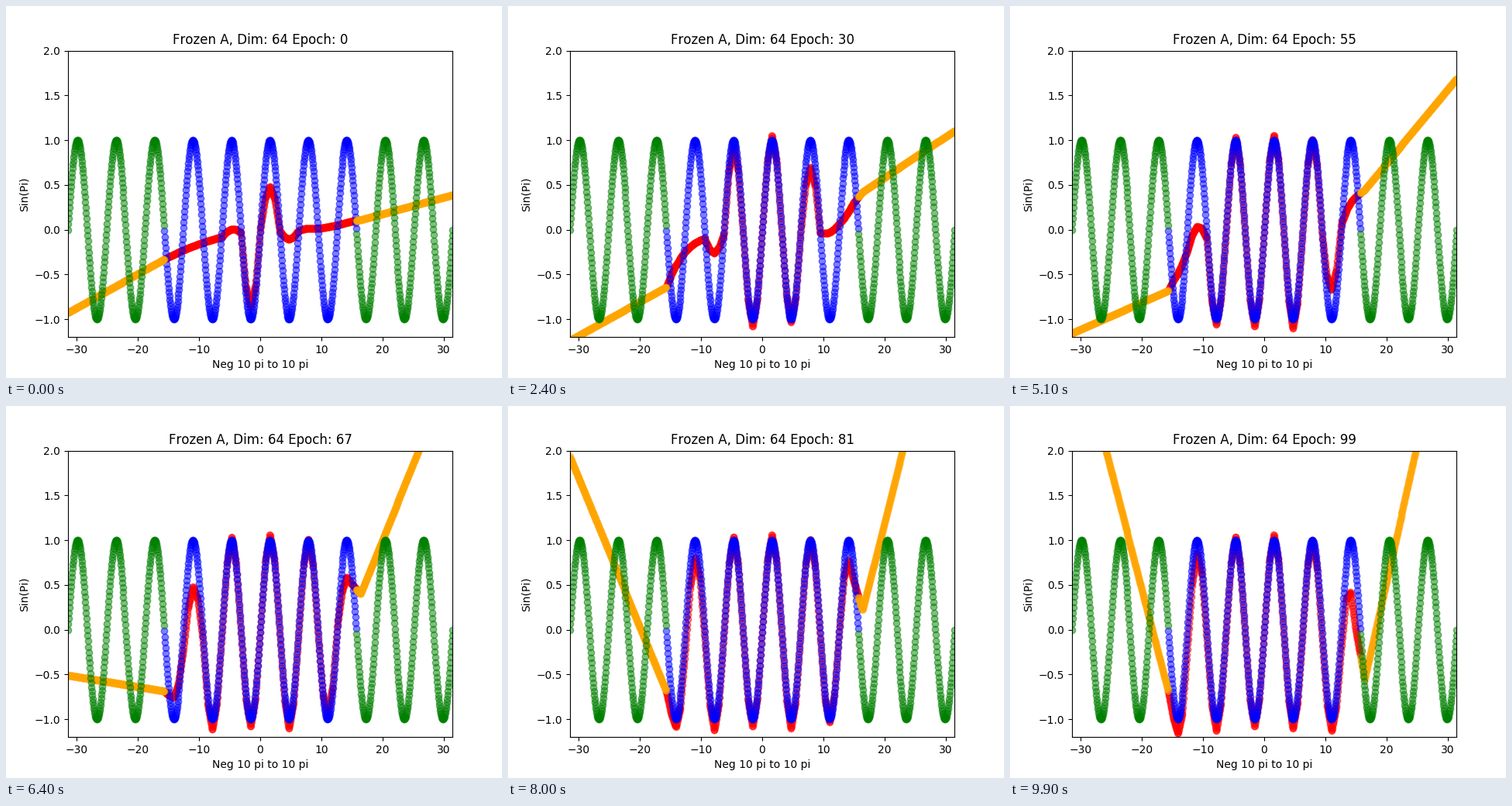
Animation of 640x480 px, one loop 10000 ms. Source, as a matplotlib script:

```python
import numpy as np
import matplotlib.pyplot as plt
from matplotlib.animation import FuncAnimation

plt.rcParams["text.kerning_factor"] = 6

EPOCHS = 100
SPAN = 10 * np.pi
EDGE = 5 * np.pi
TURN = 16.4  # where the right tail bends away

x = np.linspace(-SPAN, SPAN, 1000)
inside = np.abs(x) <= EDGE
truth = np.sin(x)

# Epoch at which each half wave, left to right, is half learned
START = np.array([68, 64, 39, 17, -8, 1, 14, 25, 51, 66])

knots = np.append(np.linspace(-EDGE, EDGE, 41)[:-1], TURN)
wave = np.floor(knots / np.pi).astype(int) + 5
reach = np.minimum(np.abs(knots) / EDGE, 1)


def sigmoid(t):
    return 1 / (1 + np.exp(-t))


def predict(epoch):
    """Piecewise linear fit: a drifting baseline plus the learned half waves."""
    settle = 1 - np.exp(-epoch / 15)
    rim = 0.22 + 0.36 * settle
    fall = 1.1 * (epoch / EPOCHS) ** 7

    height = np.where(knots > 0, rim - fall, -rim)
    drift = height * reach ** (2 + 4 * settle) - 0.11 * reach
    learned = np.append(sigmoid((epoch - START) / 6), 0)[wave]
    y = drift + learned * (1.08 - 0.6 * reach ** 6) * np.sin(knots)

    left = 0.038 - 0.31 * sigmoid((epoch - 77) / 6)
    right = 0.0185 + 0.03 * settle + 0.26 * sigmoid((epoch - 68) / 7)
    first = y[0] - left * (SPAN - EDGE)
    last = y[-1] + right * (SPAN - TURN)
    return np.interp(x, np.r_[-SPAN, knots, SPAN], np.r_[first, y, last])


fig, ax = plt.subplots(figsize=(6.4, 4.8), dpi=100)


def dots(mask, color):
    return ax.scatter(x[mask], truth[mask], color=color, alpha=0.5)


seen = dots(inside, "red")
dots(inside, "blue")
unseen = dots(~inside, "orange")
dots(~inside, "green")

ax.set_xlim(-SPAN, SPAN)
ax.set_ylim(-1.2, 2)
ax.set_xlabel("Neg 10 pi to 10 pi")
ax.set_ylabel("Sin(Pi)")
title = ax.set_title("")

# Epochs play in alphabetical order: 0, 1, 10, 11, ..., 19, 2, 20, ...
order = sorted(range(EPOCHS), key=str)


def draw(n):
    epoch = order[n]
    y = predict(epoch)
    seen.set_offsets(np.column_stack([x[inside], y[inside]]))
    unseen.set_offsets(np.column_stack([x[~inside], y[~inside]]))
    title.set_text(f"Frozen A, Dim: 64 Epoch: {epoch}")
    return seen, unseen, title


anim = FuncAnimation(fig, draw, frames=EPOCHS, interval=100, repeat=True,
                     repeat_delay=0)
plt.show()
```
